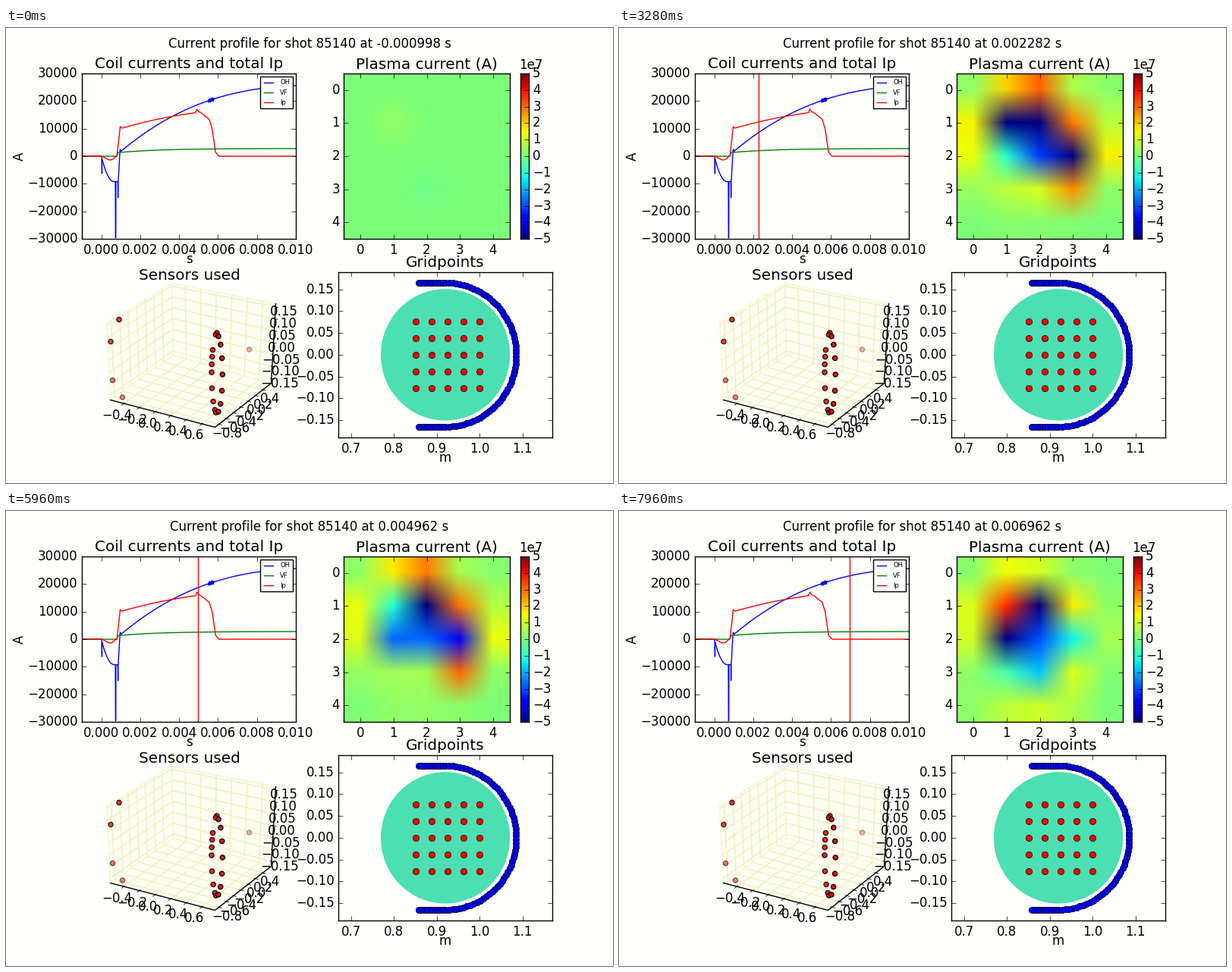
Recreate the animation shown at these times as a matplotlib script. Size 800 by 600 pixels, loop 8000 ms.

```python
import numpy as np
import matplotlib.pyplot as plt
from matplotlib.animation import FuncAnimation
from matplotlib.collections import LineCollection, PolyCollection

plt.style.use("classic")
plt.rcParams["font.family"] = "DejaVu Sans"
PAPER = "#fffffc"
MINUS = "\u2212"
FRAMES, STEP = 200, 40
rng = np.random.default_rng(4)

fig = plt.figure(figsize=(8, 6), dpi=100, facecolor=PAPER)


def panel(x, y, w, h, title=""):
    ax = fig.add_axes([x / 800, 1 - (y + h) / 600, w / 800, h / 600], facecolor=PAPER)
    ax.set_title(title)
    return ax


W, H = 620 / 2.2, 480 / 2.2
X1, Y1 = 100, 60
X2, Y2 = 720 - W, 540 - H

# Layer in stage pixels for the 3D box and loose labels
stage = fig.add_axes([0, 0, 1, 1])
stage.set_xlim(-0.5, 799.5)
stage.set_ylim(599.5, -0.5)
stage.axis("off")


def label(x, y, text, **kw):
    kw = {"ha": "center", "va": "baseline", "fontsize": 12, **kw}
    stage.text(x, y, text, **kw)


def number(v, digits):
    return f"{v:.{digits}f}".replace("-", MINUS)


def set_ticks(axis, values, digits):
    axis.set_ticks(values, [number(v, digits) for v in values])


# ---- Coil currents (time in ms, current in kA) ----
def ip_current(t):
    dip = -1.35 * np.sin(np.pi * np.clip(t / 0.75, 0, 1) ** 1.4)
    flat = np.interp(t, [0.8, 0.87, 0.97, 1.05, 4.85, 4.91, 5, 5.15, 5.55, 5.7, 5.87, 6.05],
                     [0, 4, 10.8, 10.2, 15.8, 17.1, 16.2, 15.7, 13.4, 10, 1.5, 0])
    return dip + flat + 0.5 * np.sin(np.pi * np.clip((t - 1.05) / 3.8, 0, 1))


RISE = np.polyfit([1.05, 4.36, 6.96, 10], [2, 16.9, 23, 25.6], 3)


def oh_current(t):
    dip = -9.2 * (1 - (1 - np.clip(t / 0.65, 0, 1)) ** 2)
    v = dip + np.clip((t - 0.87) / 0.09, 0, 1) * 11.6
    for at, width, low in ((0.03, 0.005, -6.3), (0.736, 0.01, -29.6), (0.855, 0.005, -15)):
        v = np.where(abs(t - at) < width, low, v)
    burst = (abs(t - 5.65) < 0.14) * rng.uniform(-0.7, 0.6, t.size)
    return np.where(t < 1, v, np.polyval(RISE, t) + burst)


def vf_current(t):
    jump = np.clip((t - 0.8) * 20, 0, 1)
    return jump * (1.3 + 1.5 * (1 - np.exp((0.85 - t) / 2.2)))


coil = panel(X1, Y1, W, H, "Coil currents and total Ip")
t = np.linspace(-1, 10, 2600)
for f, color, name in ((oh_current, "b", "OH"), (vf_current, "g", "VF"),
                       (ip_current, "r", "Ip")):
    coil.plot(t / 1000, f(t) * 1000, color, label=name)
cursor, = coil.plot([0, 0], [-30000, 30000], "r")
coil.set_xlim(-0.001, 0.01)
coil.set_ylim(-30000, 30000)
set_ticks(coil.xaxis, np.arange(6) * 0.002, 3)
set_ticks(coil.yaxis, np.arange(-3, 4) * 10000, 0)
coil.legend(prop={"size": 6}, loc="upper right")
label(17.5, 168.5, "A", rotation=90, va="center")
label(241, 310, "s")

# ---- Plasma current on a 5 x 5 grid: scaled rim around a free 3 x 3 core ----
jet = plt.get_cmap("jet")
FAINT = np.zeros((5, 5))
FAINT[1, 1], FAINT[3, 2] = 0.3, -0.15
TOP = [0.3, 2.3, 3.6, 0.7, 0.2]
LEFT = [1.9, 1.7, 0.4]
RIGHT = [0.9, 1.8, 0.3]
BOTTOM = [0.1, 0.4, 0.5, 0.3, 0]


def make_grid(left, right, bottom, core):
    g = np.zeros((5, 5))
    g[0] = np.array(TOP) * ([left] * 2 + [right] * 3)
    g[1:4, 0] = np.array(LEFT) * left
    g[1:4, 4] = np.array(RIGHT) * right
    g[4] = np.array(BOTTOM) * bottom
    g[1:4, 1:4] = np.reshape(core, (3, 3))
    return g


TIMES = [1.082, 2.282, 3.362, 4.362, 5.402, 6.962]
GRIDS = [
    make_grid(1.9, 1.35, 0.8, [-5, -5, 5, -1, -4, -5, 1.3, 1.8, 2.6]),
    make_grid(0.8, 0.85, 0.3, [-5, -5, 2.8, -1, -3.2, -5, 0.8, 1.1, 2.6]),
    make_grid(1, 1, 1.5, [-4.2, -5, 3.8, -3.2, -4.2, -5, 0.8, 0.6, 3.3]),
    make_grid(1.1, 1.15, 1.2, [-1.4, -5, 4.6, -5, -4.2, -5, 0.9, 0.8, 3.9]),
    make_grid(0.4, 0.5, 0.2, [-0.8, -5, 1.6, -1.1, -1.6, -3.2, 0.2, 0.2, 2.4]),
    make_grid(0.6, 0.3, 2, [3.6, -5, 1.6, -5, -3, -1.3, -0.6, -1.8, 1.2]),
]


def field(ms):
    if ms < TIMES[0]:
        k = ip_current(ms) / ip_current(TIMES[0])
        return FAINT * (1 - k) + GRIDS[0] * k
    i = min(np.searchsorted(TIMES, ms, "right") - 1, len(TIMES) - 2)
    k = (ms - TIMES[i]) / (TIMES[i + 1] - TIMES[i])
    return GRIDS[i] * (1 - k) + GRIDS[i + 1] * k


def colours(grid):
    return jet(np.clip(grid / 10 + 0.5, 0, 1))[..., :3]


plasma = panel(X2 + 0.8 * W - H, Y1, H, H, "Plasma current (A)")
image = plasma.imshow(colours(FAINT), interpolation="bilinear", aspect="auto")
set_ticks(plasma.xaxis, range(5), 0)
set_ticks(plasma.yaxis, range(5), 0)

bar = panel(X2 + 0.85 * W, Y1, H / 20, H)
bar.imshow(jet(np.linspace(0, 1, 256))[:, None, :3], origin="lower",
           extent=(0, 1, -5, 5), aspect="auto", interpolation="nearest")
bar.set_xticks([])
bar.yaxis.tick_right()
set_ticks(bar.yaxis, range(-5, 6), 0)
label(675.5, 54, "1e7", ha="left")

# ---- Gridpoints ----
grid = panel(X2, Y2, W, H, "Gridpoints")
a = np.linspace(0, 2 * np.pi, 200)
grid.fill(0.92 + 0.151 * np.cos(a), 0.151 * np.sin(a), color="#4bdfb2", lw=0)
a = np.linspace(np.pi / 2, -np.pi / 2, 62)
row = np.linspace(0.857, 0.914, 10)
R = 0.1655
grid.plot(np.r_[row, 0.92 + R * np.cos(a), row[::-1]],
          np.r_[row * 0 + R, R * np.sin(a), row * 0 - R], "bo")
gx, gy = np.meshgrid(np.linspace(0.85, 1, 5), np.linspace(-0.0768, 0.0768, 5))
grid.plot(gx.ravel(), gy.ravel(), "ro")
grid.set_xlim(0.67, 1.17)
grid.set_ylim(-0.19, 0.19)
set_ticks(grid.xaxis, np.arange(7, 12) * 0.1, 1)
set_ticks(grid.yaxis, np.arange(-3, 4) * 0.05, 2)
label(578.5, 572, "m")

# ---- Sensors in the 3D box ----
LT, LB, FRONT, BT, BB, RT, RB = np.array(
    [(132, 388), (137, 490), (275, 526), (218, 336), (220, 431), (355, 363), (349, 468)],
    float)
panes = [(LT, BT, BB, LB), (BT, RT, RB, BB), (LB, FRONT, RB, BB)]
stage.add_collection(PolyCollection(panes, facecolors="#fdfdf2", edgecolors="#f6f6d4"))
wires, ticks = [], []
xd, yd = (FRONT - LB) / 143, (LB - BB) / 102


def mix(p, q, k):
    return p + (q - p) * k


def wire(k, d, *edges):
    path = [mix(p, q, k) for p, q in edges]
    wires.append(path)
    ticks.append((path[0] - 2 * d, path[0] + 4 * d))


for i in range(6):
    wire(0.13 + 0.149 * i, yd, (LB, FRONT), (BB, RB), (BT, RT))
    label(145.5 + 20.3 * i, 516 + 5.2 * i, number((i - 2) / 5, 1))
for i in range(7):
    wire(0.07 + 0.13 * i, xd, (FRONT, RB), (LB, BB), (LT, BT))
    label(291 + 9.5 * i, 540 - 7.8 * i, number((i - 4) / 5, 1))
    wire(0.04 + 0.15 * i, xd, (RT, RB), (BT, BB), (LT, LB))
    label(366 - i, 378.5 + 15.9 * i, number((3 - i) * 0.05, 2))
stage.add_collection(LineCollection(wires, colors="#f0f0c2", linewidths=1))
stage.add_collection(LineCollection(ticks, colors="k", linewidths=0.6))
stage.plot(*np.array([LB, FRONT, RB, RT]).T, "k", lw=1)


def sensors(x, y, alpha):
    rgba = np.zeros((len(x), 4))
    rgba[:, 3] = alpha
    stage.scatter(x, y, s=20, c=rgba + [0.93, 0.02, 0, 0], edgecolors=rgba,
                  linewidths=1, zorder=3)


sensors([320, 153, 140, 137.5, 148.5], [423.5, 486.5, 464, 413, 384],
        [0.3, 0.5, 0.55, 0.75, 0.8])
y = np.array([401.5, 404, 424, 433, 443, 453.5, 474.5, 492, 503, 506.5])
sensors(278.5 - 8 * np.sqrt(1 - ((y - 455) / 54) ** 2), y, 0.85)
a = np.radians(np.linspace(72, -74, 7))
sensors(277.3 + 7.5 * np.cos(a), 455.5 - 52 * np.sin(a), 0.97)
label(241, 332, "Sensors used", fontsize=14.4)

heading = fig.text(0.5, 0.98, "", ha="center", va="top", fontsize=12)


def update(n):
    s = -0.000998 + 0.00004 * n
    heading.set_text(f"Current profile for shot 85140 at {s:.6f} s")
    cursor.set_xdata([s, s])
    image.set_data(colours(field(s * 1000)))
    return heading, cursor, image


anim = FuncAnimation(fig, update, frames=FRAMES, interval=STEP, repeat=True,
                     repeat_delay=0, blit=False)
plt.show()
```
